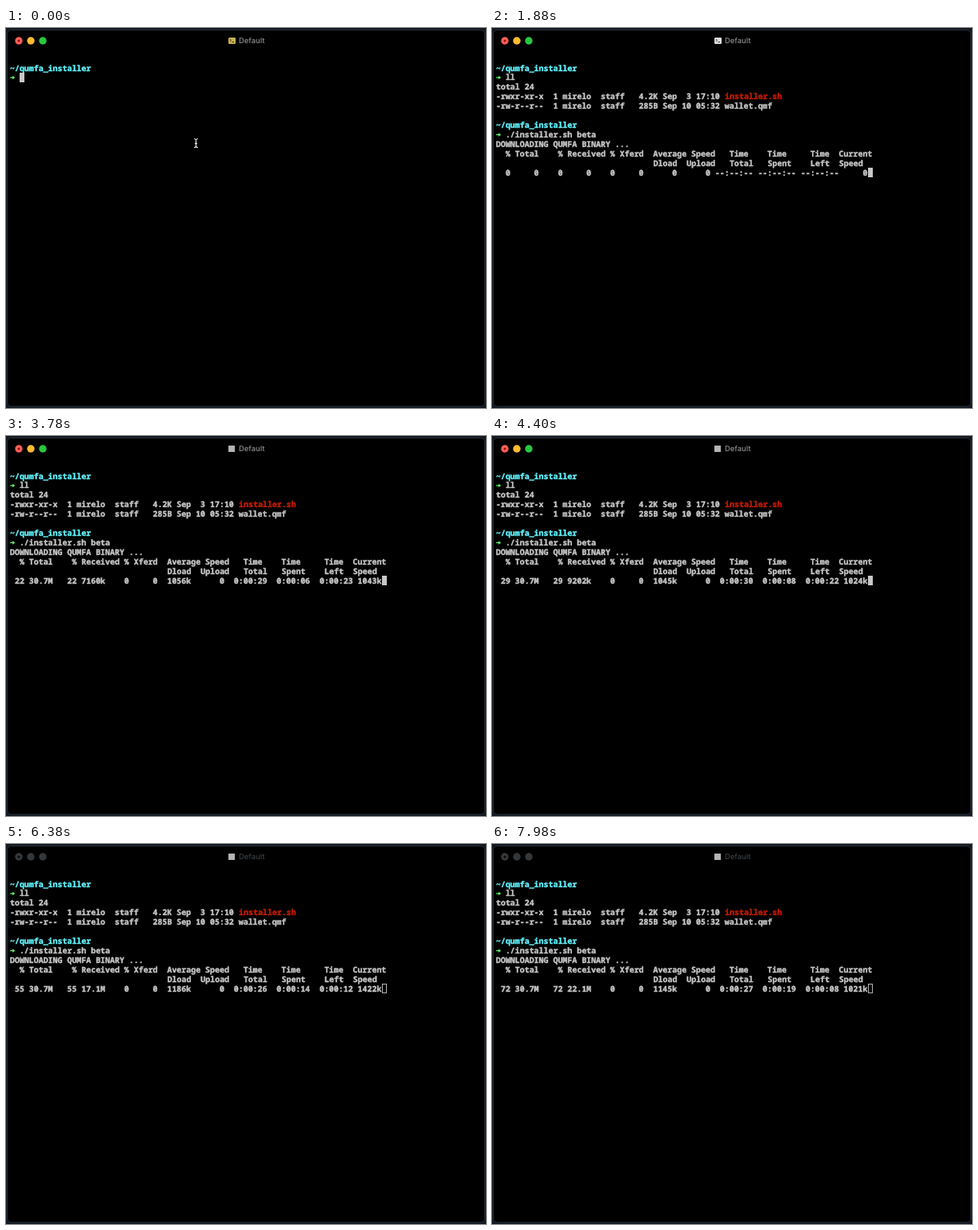
Recreate the animation shown at these times as an HTML page. Size 600 by 476 pixels, loop 8000 ms.

```html
<!DOCTYPE html>
<html lang="en">
<head>
<meta charset="utf-8">
<title>Terminal</title>
<style>
  html, body { margin: 0; width: 100%; height: 100%; overflow: hidden; background: #10171f; }
  svg { display: block; width: 100vw; height: 100vh; }
  .term text {
    font: bold 9.93px "Noto Sans Mono", "DejaVu Sans Mono", monospace;
    white-space: pre;
    text-rendering: geometricPrecision;
    stroke-width: .4px;
  }
  #title { font: 500 9.4px Inter, Roboto, sans-serif; text-rendering: geometricPrecision; }
</style>
</head>
<body>
<svg viewBox="0 0 600 476">
  <rect width="600" height="476" fill="#10171f"/>
  <rect x="1.5" y="2.5" width="597" height="471.5" rx="5" fill="#000" stroke="#28323d"/>
  <g id="lights">
    <circle cx="16" cy="16" r="4.7"/>
    <circle cx="31" cy="16" r="4.7"/>
    <circle cx="46" cy="16" r="4.7"/>
  </g>
  <circle id="dot" cx="16" cy="16" r="1.5"/>
  <g id="shell">
    <rect id="shellBox" x="278" y="12" width="9" height="8" rx="1.2"/>
    <path d="M279.8 14l1.6 1.4-1.6 1.4M282.4 17.6h2.6" fill="none" stroke="#222" stroke-width=".9"/>
  </g>
  <rect id="badge" x="278" y="12" width="8" height="8" fill="#b4b4b4"/>
  <text id="title" x="291" y="19.4">Default</text>
  <g id="screen" class="term"></g>
  <path id="pointer" d="M235 138.7q2.5 0 2.5 2v7q0 2 -2.5 2M240 138.7q-2.5 0 -2.5 2v7q0 2 2.5 2M236 144.6h3"
        fill="none" stroke="#e6e6e6" stroke-width="1.1"/>
</svg>
<script>
const LOOP = 8000, LEFT = 5, TOP = 44, CELL = 5.96, LINE = 11.92;
const FG = '#c7c7c7', CYAN = '#5ff5ff', RED = '#c91b00', GREEN = '#5ff967';

const LIST_AT = 500, RUN_AT = 1720, HEAD_AT = 1820, CURL_ICON_AT = 2000, BLUR_AT = 5400;
const TICK_FROM = 1890, TICK = 310;
const TOTAL_K = 31437;

const keysList = [[240, 'l'], [340, 'll']];
const keysRun = [
  [740, '.'], [800, './'], [860, './i'], [920, './in'], [965, './ins'],
  [1060, './installer.sh '], [1220, './installer.sh b'], [1290, './installer.sh be'],
  [1360, './installer.sh bet'], [1430, './installer.sh beta']
];

// seconds spent, received k, average k/s, current k/s
const samples = [
  [0, 700, 900, 900], [3, 4097, 1073, 1072], [8, 9202, 1045, 1024],
  [14, 17530, 1186, 1422], [19, 22670, 1145, 1021], [20, 23700, 1140, 1020]
];

const $ = id => document.getElementById(id);
const show = (id, on) => $(id).setAttribute('visibility', on ? 'visible' : 'hidden');
const fill = (el, color) => el.setAttribute('fill', color);
const colX = col => LEFT + col * CELL;
const rowY = row => TOP + row * LINE;

const put = (row, text, color = FG, col = 0) =>
  `<text x="${colX(col)}" y="${rowY(row) + 9.5}" fill="${color}" stroke="${color}">${text}</text>`;

const typed = (keys, t) => keys.reduce((s, [at, text]) => t >= at ? text : s, '');

function prompt(row, command) {
  const y = rowY(row) + 6.2;
  return put(row - 1, '~/qumfa_installer', CYAN) +
    `<path d="M5.2 ${y - .7}h3v-1.7l3 2.4-3 2.4v-1.7h-3z" fill="${GREEN}"/>` +
    put(row, command, FG, 2);
}

function cursor(row, col, active) {
  const x = Math.round(colX(col)), y = Math.round(rowY(row));
  return active
    ? `<rect x="${x}" y="${y}" width="6" height="12" fill="${FG}"/>`
    : `<rect x="${x + .5}" y="${y + .5}" width="5" height="11" fill="none" stroke="${FG}" stroke-width=".9"/>`;
}

function sampleAt(sec) {
  const i = Math.max(1, samples.findIndex(s => s[0] >= sec));
  const a = samples[i - 1], b = samples[i];
  const k = (sec - a[0]) / (b[0] - a[0]);
  return a.map((v, n) => Math.round(v + (b[n] - v) * k));
}

const size = k => k < 10000 ? k + 'k' : (Math.floor(k / 102.4) / 10).toFixed(1) + 'M';
const clock = s => '0:00:' + String(s).padStart(2, '0');

function progress(t) {
  const sec = Math.floor((t - TICK_FROM) / TICK);
  let cells = [0, 0, 0, 0, 0, 0, 0, 0, '--:--:--', '--:--:--', '--:--:--', 0];
  if (sec >= 1) {
    const [, got, avg, now] = sampleAt(sec);
    const pct = Math.floor(got / TOTAL_K * 100), total = Math.floor(TOTAL_K / avg);
    cells = [pct, '30.7M', pct, size(got), 0, 0, avg + 'k', 0,
      clock(total), clock(sec), clock(total - sec), now + 'k'];
  }
  const widths = [3, 6, 5, 6, 5, 6, 7, 7, 9, 9, 9, 6];
  return cells.map((c, i) => String(c).padStart(widths[i])).join('');
}

function screen(t) {
  const active = t < BLUR_AT;
  const list = typed(keysList, t);
  let out = prompt(1, list);
  if (t < LIST_AT) return out + cursor(1, 2 + list.length, active);

  const run = typed(keysRun, t);
  out += put(2, 'total 24') +
    put(3, '-rwxr-xr-x  1 mirelo  staff   4.2K Sep  3 17:10') +
    put(3, 'installer.sh', RED, 48) +
    put(4, '-rw-r--r--  1 mirelo  staff   285B Sep 10 05:32 wallet.qmf') +
    prompt(7, run);
  if (t < RUN_AT) return out + cursor(7, 2 + run.length, active);

  out += put(8, 'DOWNLOADING QUMFA BINARY ...');
  if (t < HEAD_AT) return out + cursor(9, 0, active);

  return out +
    put(9, '  % Total    % Received % Xferd  Average Speed   Time    Time     Time  Current') +
    put(10, 'Dload  Upload   Total   Spent    Left  Speed', FG, 33) +
    put(11, progress(t)) + cursor(11, 78, active);
}

function chrome(t) {
  const active = t < BLUR_AT;
  const colors = active ? ['#ff5f57', '#febc2e', '#28c840'] : Array(3).fill('#34373a');
  [...$('lights').children].forEach((c, i) => fill(c, colors[i]));
  fill($('dot'), active ? '#8c1410' : '#0a0a0a');
  fill($('title'), active ? '#8f8f8f' : '#3a3f45');
  fill($('shellBox'), t < RUN_AT ? '#c8b250' : '#e0e0e0');
  show('shell', t < CURL_ICON_AT);
  show('badge', t >= CURL_ICON_AT);
  show('pointer', t < keysList[0][0]);
}

let last = '';
function render(t) {
  chrome(t);
  const html = screen(t);
  if (html !== last) $('screen').innerHTML = last = html;
}

const start = performance.now();
function frame() {
  render((performance.now() - start) % LOOP);
  requestAnimationFrame(frame);
}
frame();
</script>
</body>
</html>
```
